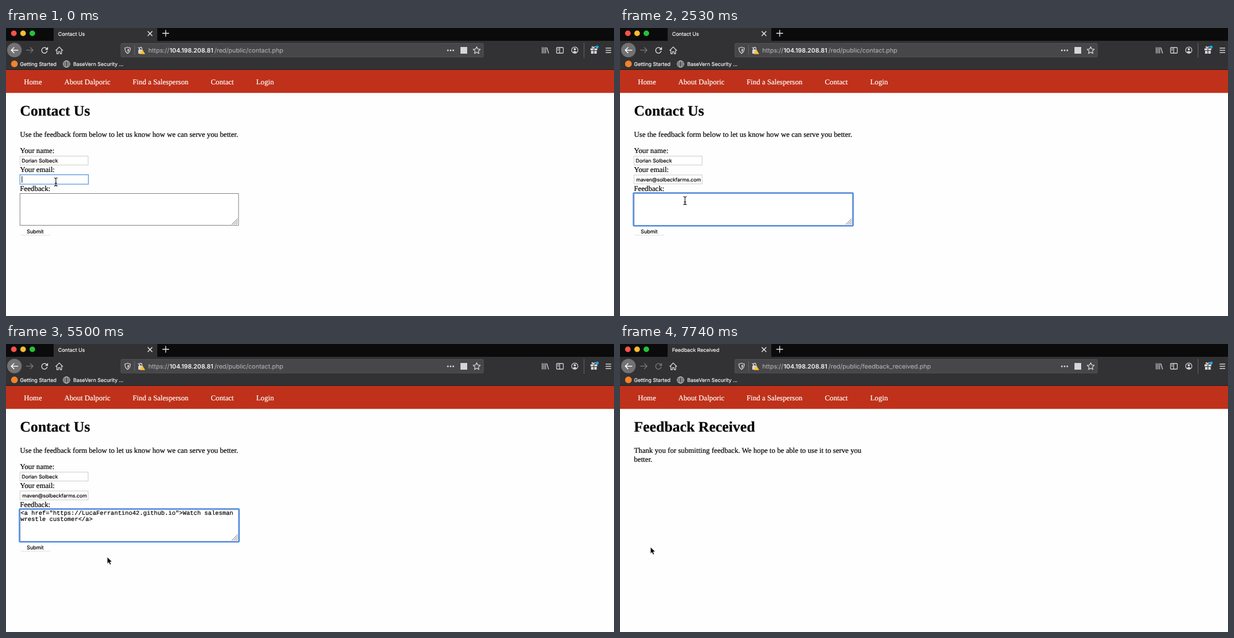
Write an HTML page that moves like this. It is 1085 by 516 pixels and loops after 8000 ms.

```html
<!DOCTYPE html>
<html lang="en">
<head>
<meta charset="utf-8">
<title>Contact form</title>
<style>
  html, body { margin: 0; width: 100%; height: 100%; overflow: hidden; background: #fefefe; }
  svg { display: block; width: 100vw; height: 100vh; }
  text { white-space: pre; stroke: #000; stroke-width: .2px; text-rendering: geometricPrecision; }
  .ui { font: 9.1px Inter, "Open Sans", sans-serif; fill: #f9f9fa; stroke: #f9f9fa; }
  .url { font-size: 11px; fill: #a9a9ac; stroke: #a9a9ac; }
  .host { font-size: 10.8px; font-weight: 600; fill: #f9f9fa; stroke: none; }
  .field { font: 9px Inter, "Open Sans", sans-serif; }
  .page { font: 13.19px "Liberation Serif", serif; }
  .page .h1 { font-size: 26.35px; font-weight: bold; }
  .nav text { fill: #fff; stroke: #fff; }
  .code { font: 10.73px "Liberation Mono", monospace; }
  .icon { fill: none; stroke: #d6d6d8; stroke-width: 1.3; stroke-linecap: round; stroke-linejoin: round; }
  .solid { fill: #d6d6d8; stroke: none; }
  .caret { stroke: #000; stroke-width: 1; }
</style>
</head>
<body>
<svg viewBox="0 0 1085 516">
  <defs>
    <linearGradient id="press" x2="0" y2="1">
      <stop stop-color="#4b97fd"/><stop offset="1" stop-color="#0759ef"/>
    </linearGradient>
    <filter id="soft" x="-20%" y="-50%" width="140%" height="220%"><feGaussianBlur stdDeviation="2"/></filter>
  </defs>
  <rect width="1085" height="516" fill="#fefefe"/>

  <!-- browser window -->
  <rect width="1085" height="23" fill="#0b0b0c"/>
  <path d="M0 23H85V0H270V23H1085V75H0Z" fill="#323234"/>
  <rect y="74" width="1085" height="1" fill="#1b1b1d"/>
  <circle cx="14" cy="9.5" r="5" fill="#fc5249"/>
  <circle cx="30.5" cy="9.5" r="5" fill="#fdbc2e"/>
  <circle cx="47" cy="9.5" r="5" fill="#24c138"/>
  <rect id="throbber" y="9" width="5" height="2" rx="1" fill="#b4b4b6"/>
  <text id="title" class="ui" y="13.6"></text>
  <rect x="205" y="27.5" width="647" height="24.5" rx="2" fill="#474749" stroke="#59595b" stroke-width=".8"/>
  <text class="ui url" x="254" y="44">https://</text>
  <text class="ui host" x="292" y="44">104.198.208.81</text>
  <text id="path" class="ui url" x="372" y="44"></text>
  <circle cx="15" cy="39.5" r="13" fill="#727274"/>
  <g class="icon">
    <path d="M253.3 6.3l7.4 7.4M260.7 6.3l-7.4 7.4M279.5 9.5h11M285 4v11" stroke="#f2f2f4"/>
    <path d="M21 39.7H9.5M14.2 35l-4.8 4.7 4.8 4.7" stroke="#fff" stroke-width="1.6"/>
    <path d="M36.5 39.7H48M43.5 35l4.7 4.7-4.7 4.7" stroke="#7b7b7e"/>
    <g id="reload">
      <path d="M73 37.6A5 5 0 1 0 73.4 41.6" stroke-width="1.5"/>
      <path class="solid" d="M75 33.8v5.4h-5.4z"/>
    </g>
    <path id="stop" d="M64 35l9.6 9.6M73.6 35L64 44.6" stroke-width="1.5"/>
    <path d="M88.8 40.3L95 34l6.2 6.3M90.7 39.5V46h2.8v-3.6h3V46h2.8V39.5"/>
    <path d="M217 34.3c1.6 1 3.2 1.3 4.8 1.3 0 5-.8 8-4.8 10-4-2-4.8-5-4.8-10 1.6 0 3.2-.3 4.8-1.3z"/>
    <path class="solid" d="M217 37.2v6c1.8-1.2 2.5-3 2.6-5.4-1 0-1.8-.2-2.6-.6z"/>
    <path d="M229.5 31v17M1031.5 27v26" stroke="#67676a" stroke-width="1"/>
    <rect class="solid" x="236" y="39" width="8.4" height="7" rx="1"/>
    <path d="M238 39v-2.2a2.3 2.3 0 0 1 4.6 0V39M236 35l9 9"/>
    <path d="M243.6 39.8l4 6.4h-8z" fill="#ffbf2b" stroke="#ffbf2b" stroke-width="1"/>
    <path d="M788.5 40h.1M793.3 40h.1M798.1 40h.1" stroke-width="3"/>
    <rect class="solid" x="811" y="34" width="12" height="12"/>
    <path d="M840 33.6l1.9 4.1 4.4.5-3.3 3 .9 4.4-3.9-2.2-3.9 2.2.9-4.4-3.3-3 4.4-.5z"/>
    <path d="M957 35v10M960 35v10M963 35v10M965.2 35.3l3 9.7"/>
    <path d="M983.5 35h10a1 1 0 0 1 1 1v8a1 1 0 0 1-1 1h-10a1 1 0 0 1-1-1v-8a1 1 0 0 1 1-1zM988 35v10M984.6 37.6h1.4M984.6 39.8h1.4"/>
    <circle cx="1015" cy="39.7" r="5.6"/>
    <circle class="solid" cx="1015" cy="38" r="2.1"/>
    <path class="solid" d="M1011.2 43.2q3.8-4 7.6 0-3.8 3.5-7.6 0z"/>
    <path class="solid" d="M1043 36.5h5.5v3.4h-5.5zM1049.7 36.5h5.5v3.4h-5.5zM1044 41h4.5v5h-4.5zM1049.7 41h4.5v5h-4.5z"/>
    <path d="M1049 36q-4-.5-3.4-2.3 2-1.3 3.4 2.3 1.2-3.4 3-2.5"/>
    <path d="M1070.5 36h9M1070.5 40h9M1070.5 44h9"/>
    <path d="M114 64.5a6 6 0 1 1-12 0 6 6 0 0 1 12 0zM110.8 64.5a2.8 6 0 1 1-5.6 0 2.8 6 0 0 1 5.6 0zM102 64.5h12M103 61.2h10M103 67.8h10" stroke-width=".9"/>
  </g>
  <circle cx="1055" cy="34" r="2.6" fill="#0cb0f5"/>
  <circle cx="15" cy="64.3" r="6" fill="#f5822a"/>
  <text class="ui" x="25" y="68">Getting Started</text>
  <text class="ui" x="120" y="68">BaseVern Security ...</text>

  <!-- web page -->
  <rect y="75" width="1085" height="41.3" fill="#bf311a"/>
  <g class="page">
    <g class="nav">
      <text x="32" y="100.8">Home</text>
      <text x="104" y="100.8">About Dalporic</text>
      <text x="226" y="100.8">Find a Salesperson</text>
      <text x="365.5" y="100.8">Contact</text>
      <text x="446.5" y="100.8">Login</text>
    </g>
    <g id="thanks">
      <text class="h1" x="25" y="157">Feedback Received</text>
      <text x="25" y="195.4">Thank you for submitting feedback. We hope to be able to use it to serve you</text>
      <text x="25" y="211">better.</text>
    </g>
  </g>
  <g id="form">
    <g class="page">
      <text class="h1" x="25" y="157">Contact Us</text>
      <text x="25" y="195.4">Use the feedback form below to let us know how we can serve you better.</text>
      <text x="25" y="224.2">Your name:</text>
      <text x="25" y="258.1">Your email:</text>
      <text x="25" y="291.7">Feedback:</text>
    </g>
    <g fill="#fff" stroke="#cbcbcb">
      <rect x="25" y="229.5" width="121.5" height="16"/>
      <rect x="25" y="263.3" width="121.5" height="16"/>
      <rect x="25" y="296.5" width="390" height="57" stroke="#7d7d7d"/>
    </g>
    <rect id="emailRing" x="24.8" y="262.7" width="122.4" height="17.2" fill="none" stroke="#6fabf5" stroke-width="1.4"/>
    <rect id="areaRing" x="24" y="295.5" width="392" height="59" rx="1.5" fill="none" stroke="#5590e8" stroke-width="2.6"/>
    <path d="M403 352l10.5-10.5M406.5 352l7-7M410 352l3.5-3.5" stroke="#555" stroke-width=".9"/>
    <text class="field" x="28" y="240.9">Dorian Solbeck</text>
    <text id="email" class="field" y="274.8"></text>
    <g id="message" class="code">
      <text x="26" y="306">&lt;a href="https://LucaFerrantino42.github.io"&gt;Watch salesman</text>
      <text x="26" y="317.4">wrestle customer&lt;/a&gt;</text>
    </g>
    <path id="caret" class="caret"/>
    <rect x="26" y="359" width="53" height="12.6" rx="2.5" fill="#d2d2d2"/>
    <rect id="button" x="26" y="358" width="53" height="12.8" rx="2.5"/>
    <text class="field" x="37" y="367.7" style="font-size:9.2px">Submit</text>
    <g id="menu">
      <rect x="25" y="281" width="122" height="18" fill="#000" opacity=".55" filter="url(#soft)"/>
      <rect id="menuBack" x="25" y="279" width="122" height="17.3"/>
      <text id="menuText" class="field" x="29" y="291" style="font-size:9.6px">dmaven@solbeckfarm...</text>
    </g>
  </g>

  <g id="pointer">
    <path id="arrow" d="M0 0V12L2.7 9.5 4.6 13.8 6.8 12.8 5 8.6H8.7Z" stroke="#fff" stroke-width=".8"/>
    <g id="beam" fill="none">
      <path d="M-3-7Q0-7 0-5 0-7 3-7M0-5V5.5M-3 7.5Q0 7.5 0 5.5 0 7.5 3 7.5M-2 2.7H2" stroke="#fff" stroke-width="2.2" opacity=".7"/>
      <path d="M-3-7Q0-7 0-5 0-7 3-7M0-5V5.5M-3 7.5Q0 7.5 0 5.5 0 7.5 3 7.5M-2 2.7H2" stroke="#000" stroke-width="1.1"/>
    </g>
  </g>
</svg>
<script>
const LOOP = 8000, TICK = 148.5;
const $ = id => document.getElementById(id);
const show = (id, on) => $(id).style.display = on ? '' : 'none';
const set = (id, attrs) => { for (const k in attrs) $(id).setAttribute(k, attrs[k]); };
const within = (n, a, b) => n >= a && n < b;

// pointer way-points: tick, x, y
const route = [
  [0, 89, 275.5], [4, 89, 275.5], [7, 75.3, 289], [8, 75.3, 289], [10, 95, 306],
  [13, 116, 309], [22, 116, 309], [27, 225, 388], [35, 225, 388], [41, 54.3, 363.7], [99, 54.3, 363.7]
];

function pointerAt(n) {
  const i = route.findIndex(p => p[0] > n);
  const [t0, x0, y0] = route[i - 1], [t1, x1, y1] = route[i];
  const u = (n - t0) / (t1 - t0), e = u * u * (3 - 2 * u);
  return [x0 + (x1 - x0) * e, y0 + (y1 - y0) * e];
}

function drawPointer(n) {
  const [x, y] = pointerAt(n);
  const overField = within(y, 262, 280) || within(y, 296, 354);
  set('pointer', { transform: `translate(${x} ${y})` });
  show('beam', overField);
  show('arrow', !overField);
  return y;
}

function drawBrowser(n) {
  const loading = within(n, 44, 51), received = n >= 49;
  show('throbber', loading);
  show('stop', loading);
  show('reload', !loading);
  set('reload', { opacity: n >= 51 ? .4 : 1 });
  set('throbber', { x: 94.5 + 4 * Math.sin((n - 49) * 1.9) });
  set('title', { x: loading ? 111 : 93 });
  $('title').textContent = received ? 'Feedback Received' : 'Contact Us';
  $('path').textContent = `/red/public/${received ? 'feedback_received' : 'contact'}.php`;
}

function drawForm(n, pointerY) {
  const filled = n >= 8, pasted = n >= 21, pressed = n === 43;
  const ink = pointerY > 280 ? '#fff' : '#000';
  show('emailRing', n < 13);
  show('areaRing', within(n, 13, 43));
  show('message', pasted);
  show('menu', within(n, 3, 8));
  set('menuBack', { fill: pointerY > 280 ? '#0a5ce0' : '#fff' });
  Object.assign($('menuText').style, { fill: ink, stroke: ink });
  set('email', { x: filled ? 29 : 28 });
  $('email').textContent = filled ? 'maven@solbeckfarms.com' : n >= 3 ? 'd' : '';
  set('button', { fill: pressed ? 'url(#press)' : '#fff' });

  const blink = n < 3 || [[13, 17], [20, 29], [32, 36], [39, 43]].some(([a, b]) => within(n, a, b));
  show('caret', blink);
  set('caret', { d: n < 3 ? 'M28.5 265.5V277' : pasted ? 'M155.5 308.5V319.5' : 'M26.5 297.5V308.5' });
}

function frame() {
  const n = Math.floor(performance.now() % LOOP / TICK);
  drawBrowser(n);
  drawForm(n, drawPointer(n));
  show('form', n < 50);
  show('thanks', n >= 50);
  requestAnimationFrame(frame);
}
frame();
</script>
</body>
</html>
```
